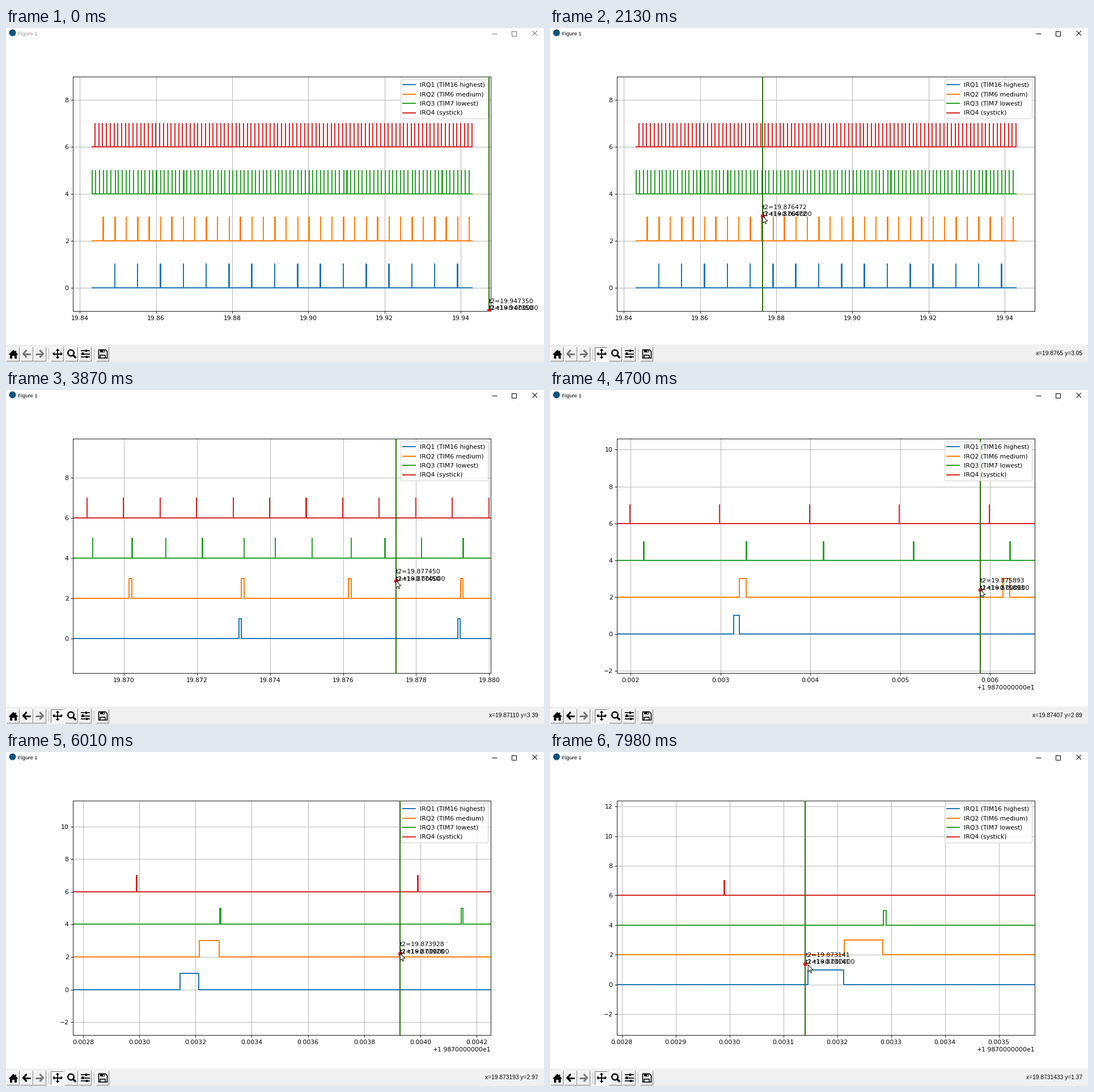
Animation of 949 by 590 pixels, one loop 8000 ms. Source, as a matplotlib script:

```python
import math
from itertools import accumulate

import numpy as np
import matplotlib.pyplot as plt
from matplotlib.animation import FuncAnimation
from matplotlib.patches import Circle, Polygon, Rectangle
from matplotlib.ticker import ScalarFormatter

W, H, DPI = 949, 590, 80
STEP, LOOP = 40, 8000
LEFT, BOTTOM, AW, AH = 118.4, 500, 737, 414
PT = 72 / DPI

plt.rcParams.update({'font.family': 'DejaVu Sans', 'font.size': 9.8})

# Pointer legs: leave (ms), arrive (ms), end point, right-button drag or not.
ENTRY = (718, 589)
ROUTE = [
    (460, 800, (430, 530), False),
    (800, 1220, (91, 575), False),
    (1330, 2010, (375.2, 332.3), False),
    (2516, 2746, (689.5, 341.8), True),
    (2930, 3180, (278.8, 319.1), False),
    (3280, 3680, (688, 337), True),
    (3860, 4080, (470.2, 336.9), False),
    (4170, 4560, (759.2, 352.9), True),
    (4760, 5050, (330.9, 334.1), False),
    (5195, 5816, (695.2, 355.9), True),
    (6000, 6260, (146, 320.6), False),
    (6402, 6949, (354, 337.5), True),
    (7410, 7919, (455.3, 376), False),
]
STATUS_LAG, MARK_LAG, ZOOM_LAG = 90, 110, 132
ACTIVATE = 1290
FIRST_MARK = (851.5, 498.5)
X_VIEW = (19.838258, AW / 6720)
Y_VIEW = (-1, 10)

starts = [ENTRY] + [leg[2] for leg in ROUTE[:-1]]
LEGS = [(a, b, np.array(p), np.array(q) - p, drag)
        for p, (a, b, q, drag) in zip(starts, ROUTE)]
BACK_ON = next(b for _, b, _, _, drag in LEGS if drag) + ZOOM_LAG


def ease(t, a, b):
    u = min(max((t - a) / (b - a), 0), 1)
    return u * u * (3 - 2 * u)


def current(t):
    return [leg for leg in LEGS if leg[0] <= t or leg is LEGS[0]][-1]


def pointer(t):
    a, b, start, move, _ = current(t)
    return start + move * ease(t, a, b)


def inside(p):
    return p[0] > LEFT and p[1] < BOTTOM


def rescale(lo, span, anchor, power):
    """Zoom an interval by a power of ten, keeping the anchor fraction fixed."""
    k = 10 ** power
    return lo + anchor * span * (1 - k), span * k


def view(t):
    """Axis intervals after all drags up to t, as the pan tool zooms them."""
    xs, ys = X_VIEW, Y_VIEW
    for a, b, start, move, drag in LEGS:
        if drag:
            dx, dy = move * ease(t - ZOOM_LAG, a, b)
            xs = rescale(*xs, (start[0] - LEFT) / AW, -dx / AW)
            ys = rescale(*ys, (BOTTOM - start[1]) / AH, dy / AH)
    return xs, ys


def to_data(v, p):
    (x0, w), (y0, h) = v
    return x0 + (p[0] - LEFT) / AW * w, y0 + (BOTTOM - p[1]) / AH * h


def status_text(t):
    """Readout below the plot; it keeps the press point during a drag."""
    leave, _, start, _, drag = current(t - STATUS_LAG)
    p, v = (start, view(leave)) if drag else (pointer(t - STATUS_LAG), view(t))
    if not inside(p):
        return ''
    x, y = to_data(v, p)
    digits = -math.floor(math.log10(v[0][1] / AW / 1.15))
    return f'x={x:.{digits}f} y={y:.2f}'


class OffsetFormatter(ScalarFormatter):
    def get_offset(self):
        if not self.offset:
            return ''
        return f'+{self.offset:.10e}'.replace('e+0', 'e')


fig = plt.figure(figsize=(W / DPI, H / DPI), dpi=DPI, facecolor='white')
ax = fig.add_axes([LEFT / W, 1 - BOTTOM / H, AW / W, AH / H])
ui = fig.add_axes([0, 0, 1, 1], zorder=3)
ui.set(xlim=(0, W), ylim=(H, 0))
ui.axis('off')

# Interrupt traces: lower priorities wait for the higher ones.
BEGIN, END, TICK, MS = 19.843280, 19.94302, 19.843146, 1e-3


def wave(rise, length, base, label):
    fall = rise + length
    x = np.column_stack([rise, rise, fall, fall]).ravel()
    y = np.tile([0, 1, 1, 0], len(rise)) + base
    ax.plot(np.r_[BEGIN, x, END], np.r_[base, y, base], lw=1.8, label=label)


n = np.arange(100)
third, sixth = n[3::3], n[6::6]
wait = 74e-6 * (n % 3 == 0) + 66e-6 * (n % 6 == 0)
wave(TICK + MS * sixth, 66e-6, 0, 'IRQ1 (TIM16 highest)')
wave(TICK + MS * third + 67e-6 * (third % 6 == 0), 72e-6, 2, 'IRQ2 (TIM6 medium)')
wave(TICK + MS * n + wait, 5e-6, 4, 'IRQ3 (TIM7 lowest)')
wave(19.84399 + MS * n, 1.5e-6, 6, 'IRQ4 (systick)')
ax.grid()
ax.legend(loc='upper right', labelspacing=.6)
ax.xaxis.set_major_formatter(OffsetFormatter())

rules = [ax.axvline(BEGIN, color=c, lw=1.5, zorder=3) for c in 'rg']
dot, = ax.plot([BEGIN], [0], 'o', color='#d62728', ms=6, zorder=4)
notes = [ui.text(0, 0, '') for _ in range(3)]


def line(x, y, width=1, color='black'):
    return ui.plot(x, y, color=color, lw=width * PT,
                   solid_capstyle='butt', solid_joinstyle='miter')[0]


def shape(points):
    return ui.add_patch(Polygon(points, fc='black', lw=0))


def box(x, y, w, h, color='black'):
    return ui.add_patch(Rectangle((x, y), w, h, fc=color, lw=0))


# Title bar
ui.add_patch(Circle((11.5, 8.5), 6, fc='#11557c', lw=0))
title = ui.text(21.5, 13, 'Figure 1', fontsize=8.4, family='Liberation Sans')
window = [
    line([857, 866], [9.5, 9.5]),
    line([892.5, 900.5, 900.5, 892.5, 892.5], [5.5, 5.5, 13.5, 13.5, 5]),
    line([928.5, 937], [5, 13.5]),
    line([928.5, 937], [13.5, 5]),
]

# Toolbar
box(0, 559, W, 31, '#f0f0f0')


def button(x, w=23):
    face = box(x, 563, w, 25, '#f0f0f0')
    lit = line([x + .5, x + .5, x + w], [587.5, 563.5, 563.5], color='white')
    dark = line([x, x + w - .5, x + w - .5], [587.5, 587.5, 563], color='#808080')
    return face, lit, dark


def arrow(cx, side, cy=575.5):
    shaft = line([cx + 7 * side, cx - 5 * side], [cy, cy], 3)
    head = line([cx, cx - 6 * side, cx], [cy - 6.5, cy, cy + 6.5], 3)
    return shaft, head


def home(cx=13):
    shape([(cx - 8.5, 577), (cx, 568.5), (cx + 8.5, 577)])
    box(cx + 3.5, 569.5, 2, 5)
    box(cx - 6, 576, 12, 7.5)
    box(cx - 1.8, 578.5, 3.6, 5, '#f0f0f0')


def cross(cx=91, cy=575.5):
    line([cx - 7, cx + 7], [cy, cy], 2)
    line([cx, cx], [cy - 7, cy + 7], 2)
    for dx, dy in ((1, 0), (-1, 0), (0, 1), (0, -1)):
        bx, by = cx + 5.5 * dx, cy + 5.5 * dy
        shape([(cx + 9 * dx, cy + 9 * dy), (bx + 3.5 * dy, by + 3.5 * dx),
               (bx - 3.5 * dy, by - 3.5 * dx)])


def lens(cx=114.5, cy=574):
    ui.add_patch(Circle((cx, cy), 5.3, fc='none', ec='black', lw=2.4 * PT))
    line([cx + 3.5, cx + 8.8], [cy + 3.5, cy + 8.8], 3.4)


def sliders(x=132.5):
    for y, knob in ((570, 9.5), (575.5, 3.5), (581, 10.5)):
        line([x, x + 15.5], [y, y], 1.7)
        box(x + knob - 1.5, y - 2.3, 3, 4.6)


def floppy(x=163.5, y=568.5):
    line([x, x + 12, x + 15, x + 15, x, x],
         [y, y, y + 3, y + 14.5, y + 14.5, y - .7], 1.6)
    box(x + 2.5, y, 8, 4.8)
    box(x + 7.5, y + 1, 1.8, 2.8, '#f0f0f0')
    line([x + 3, x + 3, x + 12, x + 12], [y + 14.5, y + 9, y + 9, y + 14.5], 1.6)


lefts = list(accumulate([1, 24, 23, 31, 25, 24, 31]))
buttons = [button(x) for x in lefts]
pan_face, pan_lit, pan_dark = buttons[3]
for x in (75.5, 155.5):
    line([x, x], [566, 585], color='#b8b8b8')
home()
back = arrow(36.5, 1)
for part in arrow(59.5, -1):
    part.set_color('#777777')
cross()
lens()
sliders()
floppy()

status = ui.text(939, 575.5, '', fontsize=9.2, family='Liberation Sans',
                 ha='right', va='center')

ARROW = np.array([(0, 0), (0, 12.3), (2.8, 9.7), (4.7, 13.8), (6.4, 13.1),
                  (4.6, 9), (8.6, 8.7)])
cursor = ui.add_patch(Polygon(ARROW, fc='white', ec='black', lw=.8, zorder=9))


def draw(i):
    t = i * STEP
    v = (x0, w), (y0, h) = view(t)
    ax.set_xlim(x0, x0 + w)
    ax.set_ylim(y0, y0 + h)

    mark = pointer(t - MARK_LAG)
    if not inside(mark):
        mark = FIRST_MARK
    x, y = to_data(v, mark)
    for rule in rules:
        rule.set_xdata([x, x])
    dot.set_data([x], [y])
    labels = (f't1={x:.6f}', f't2={x:.6f}', 't2-t1=0.000000')
    for note, label, rise in zip(notes, labels, (0, 12.5, 0)):
        note.set_text(label)
        note.set_position((mark[0], mark[1] - rise))

    active = t >= ACTIVATE
    title.set_color('black' if active else '#999999')
    for part in window:
        part.set_color('black' if active else '#777777')
    pan_face.set_facecolor('#f9f9f9' if active else '#f0f0f0')
    pan_lit.set_color('#696969' if active else 'white')
    pan_dark.set_color('white' if active else '#808080')
    for part in back:
        part.set_color('black' if t >= BACK_ON else '#777777')

    status.set_text(status_text(t))
    cursor.set_visible(t >= LEGS[0][0])
    cursor.set_xy(ARROW + pointer(t))


anim = FuncAnimation(fig, draw, frames=LOOP // STEP, interval=STEP,
                     repeat=True, repeat_delay=0, blit=False)
plt.show()
```
